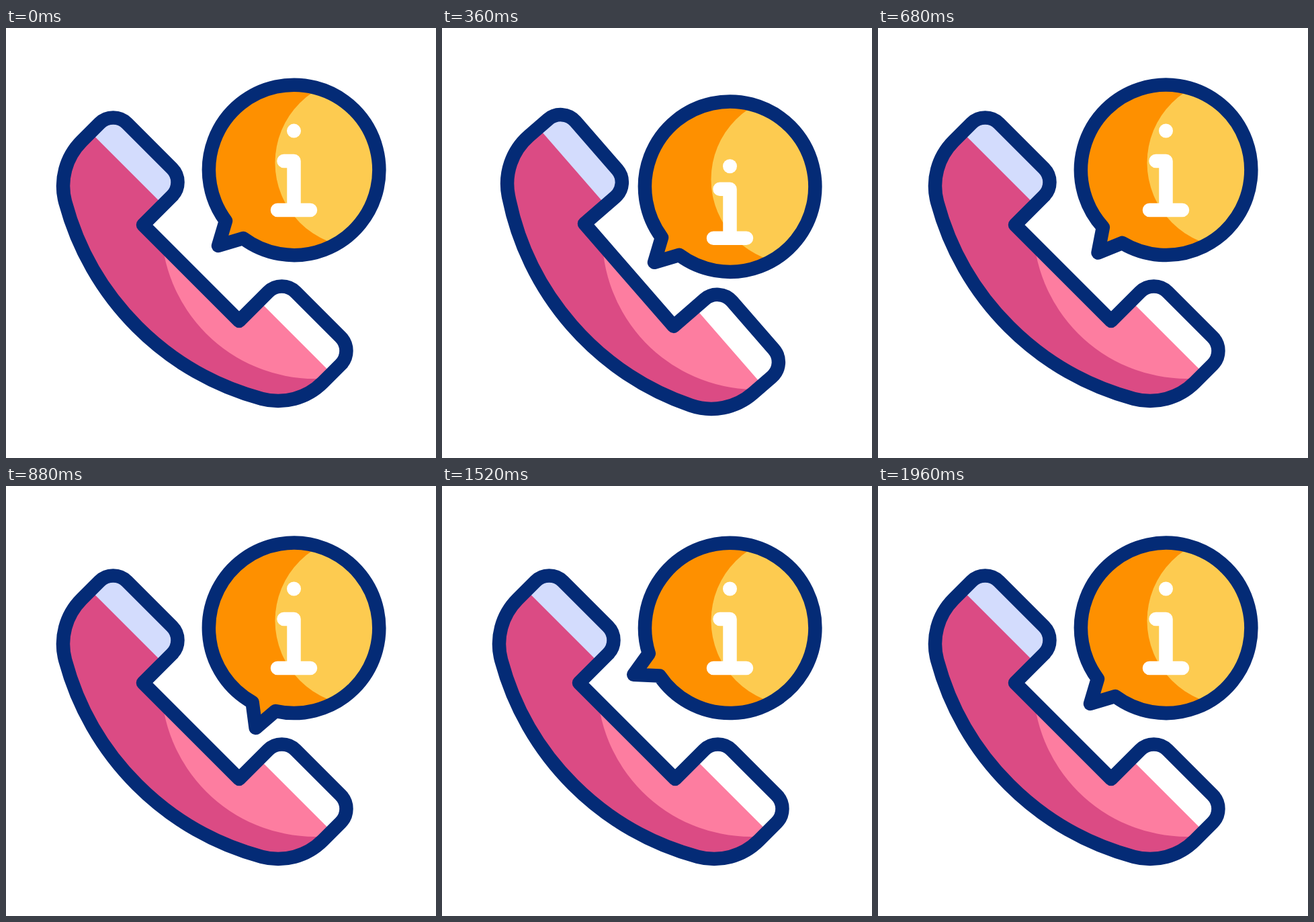
An HTML page for the animation above (2000 ms loop, 640 by 640 pixels).

```html
<!DOCTYPE html>
<html>
<head>
<meta charset="utf-8">
<style>
html, body { margin: 0; width: 100%; height: 100%; overflow: hidden; background: #fff; }
svg { display: block; width: 100%; height: 100%; }
.line { fill: none; stroke: #042b76; stroke-width: 20.5; stroke-linejoin: round; }
.mark { fill: none; stroke: #fff; stroke-width: 20.5; stroke-linecap: round; stroke-linejoin: round; }
</style>
</head>
<body>
<svg viewBox="0 0 640 640">
  <defs>
    <path id="handset" d="M204 293L247 250A29 29 0 0 0 247 209L180 142A29 29 0 0 0 139 142L112.5 168.5A94 94 0 0 0 88.2 259.3A413.7 413.7 0 0 0 380.7 551.8A94 94 0 0 0 471.5 527.5L498 501A29 29 0 0 0 498 460L431 393A29 29 0 0 0 390 393L347 436Z"/>
    <path id="balloon" d="M327 287A126.7 126.7 0 1 1 353 313L316 324Z"/>
    <clipPath id="inHandset"><use href="#handset"/></clipPath>
    <clipPath id="inBalloon"><circle cx="428.5" cy="211.5" r="126"/></clipPath>
  </defs>
  <g id="phone">
    <g clip-path="url(#inHandset)">
      <rect width="640" height="640" fill="#db4b84"/>
      <circle cx="460" cy="293" r="229" fill="#fd7da0"/>
      <path d="M90 119.5L240 269.5L300 200L160 90Z" fill="#d3dcfd"/>
      <path d="M360 389.5L500 529.5L560 460L410 340Z" fill="#fff"/>
    </g>
    <use href="#handset" class="line"/>
  </g>
  <g id="bubble">
    <use href="#balloon" class="tail" fill="#fe9000"/>
    <circle cx="526.5" cy="200.5" r="126" fill="#fdcb50" clip-path="url(#inBalloon)"/>
    <use href="#balloon" class="tail line"/>
  </g>
  <path id="stem" class="mark" d="M413.5 198H428.5V271M404 271H453"/>
  <circle id="dot" cx="428.5" cy="153" r="10.5" fill="#fff"/>
</svg>
<script>
const LOOP = 2000;
const PHONE = [[0, 0], [120, 4], [240, -4], [360, 4], [480, -4], [600, 0]];
const DROP = [[0, 0], [300, 1], [600, 0]];
const TAIL = [[600, 0], [900, -25], [1160, -25], [1520, 19.2], [1600, 19.2], [1960, 0]];

const $ = id => document.getElementById(id);
const tails = document.querySelectorAll('.tail');
const ease = x => (x + x * x * (3 - 2 * x)) / 2;

// Value at time t along a list of [time, value] keys
function track(keys, t) {
  const i = keys.findIndex(k => k[0] > t);
  if (i < 0) return keys[keys.length - 1][1];
  if (i === 0) return keys[0][1];
  const [t0, a] = keys[i - 1], [t1, b] = keys[i];
  return a + (b - a) * ease((t - t0) / (t1 - t0));
}

const move = (el, value) => el.setAttribute('transform', value);

function draw(now) {
  const t = now % LOOP;
  const drop = track(DROP, t);
  const shift = (id, dist) => move($(id), `translate(0 ${drop * dist})`);
  move($('phone'), `rotate(${track(PHONE, t)} 232 408)`);
  shift('bubble', 29.4);
  shift('stem', 49.5);
  shift('dot', 62.5);
  tails.forEach(el => move(el, `rotate(${track(TAIL, t)} 428.5 211.5)`));
}

const start = performance.now();
function tick() {
  draw(performance.now() - start);
  requestAnimationFrame(tick);
}
tick();
</script>
</body>
</html>
```
